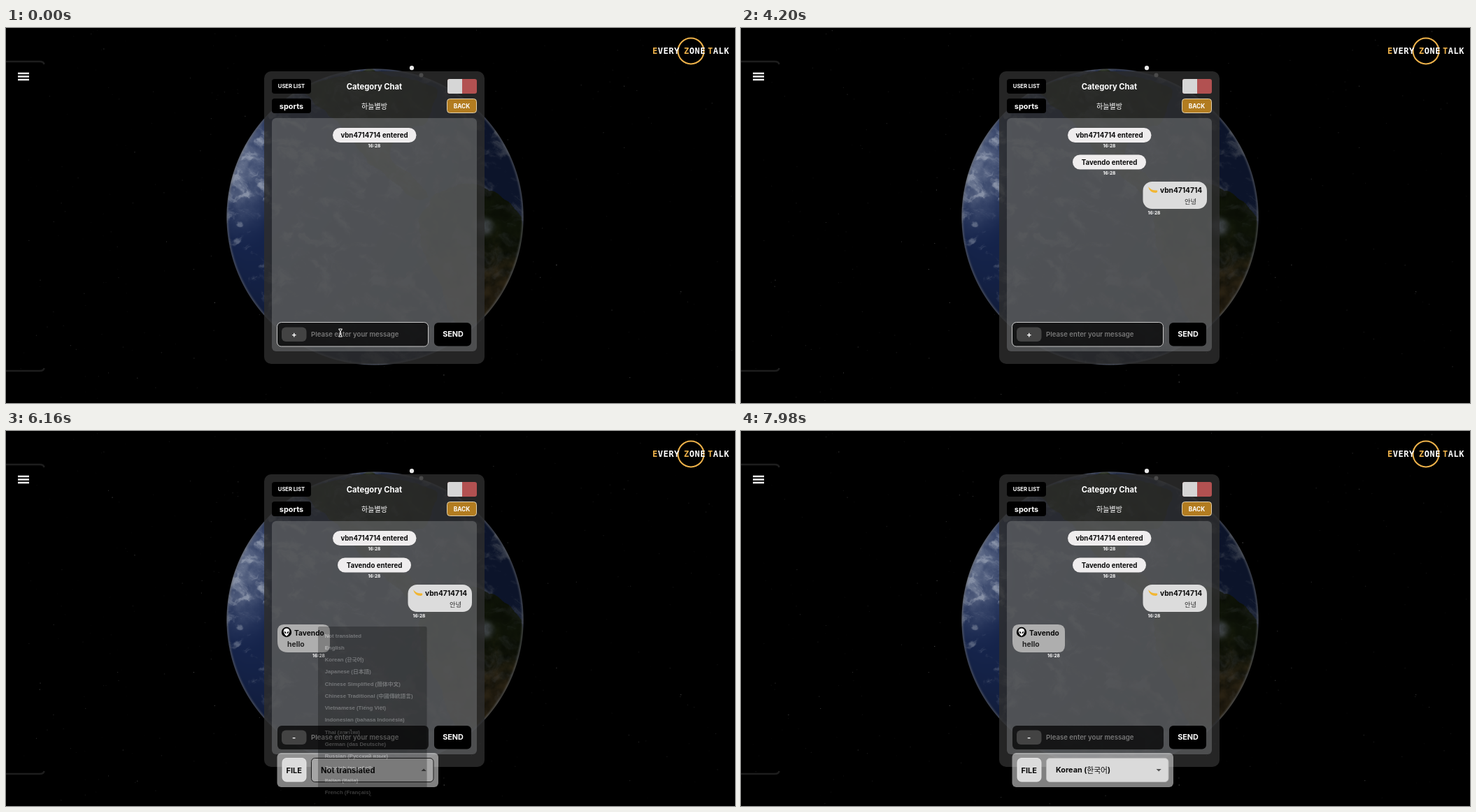
These frames come from a looping animation (1042x537 px, 8 s). An HTML page with a canvas:

```html
<!DOCTYPE html>
<html lang="en">
<head>
<meta charset="utf-8">
<title>Category Chat</title>
<style>
html, body { margin: 0; width: 100%; height: 100%; overflow: hidden; background: #000; }
canvas, svg { position: absolute; left: 0; top: 0; width: 1042px; height: 537px; }
text { font: 700 11.2px Inter, "Noto Sans CJK KR", "Noto Sans", sans-serif; dominant-baseline: central; fill: #fff; }
.mid { text-anchor: middle; }
.dark { fill: #0a0a0a; }
.bubble { font-size: 9.7px; }
.name { font-size: 10.2px; }
.time { font-size: 6.6px; }
.ko { font: 400 10px "Noto Sans CJK KR", "Noto Sans", sans-serif; }
.typed { font-size: 9.5px; }
.hint { font-size: 9.6px; font-weight: 600; fill: #777; }
.logo { font: 700 12px "DejaVu Sans Mono", monospace; letter-spacing: .5px; }
.logo tspan { fill: #eeb24a; }
.under { text-decoration: underline; }
#menu { transform-origin: 523.5px 502px; animation: grow 8s infinite paused; }
#menu text { font: 700 8.7px "Liberation Sans", "Noto Sans CJK KR", "Noto Sans", sans-serif; fill: #dedede; }
@keyframes grow {
  0%, 75.99% { opacity: 0; transform: scale(.75, .5625); animation-timing-function: cubic-bezier(.4, 0, .2, 1); }
  78.58% { transform: none; }
  79.88%, 90.13% { opacity: 1; animation-timing-function: cubic-bezier(.4, 0, .2, 1); }
  91.42% { transform: none; animation-timing-function: cubic-bezier(.4, 0, .2, 1); }
  94.01%, 100% { opacity: 0; transform: scale(.75, .5625); }
}
</style>
</head>
<body>
<canvas id="sky" width="1042" height="537"></canvas>
<canvas id="globe" width="1042" height="537"></canvas>
<svg viewBox="0 0 1042 537">
  <!-- side drawer -->
  <path d="M0 48H48Q54 48 54.5 52M0 491H48Q54 491 54.5 487" fill="none" stroke="#1d1d1d" stroke-width="2.5"/>
  <path d="M17 65H33M17 69.5H33M17 74H33" stroke="#f4f4f4" stroke-width="2.4"/>

  <!-- logo -->
  <circle cx="979" cy="33" r="18.5" fill="none" stroke="#eeb24a" stroke-width="2"/>
  <text class="logo" x="924" y="33"><tspan>E</tspan>VERY</text>
  <text class="logo" x="969" y="33"><tspan>Z</tspan>ONE</text>
  <text class="logo" x="1003" y="33"><tspan>T</tspan>ALK</text>

  <!-- panel -->
  <circle cx="580" cy="57.2" r="3.1" fill="#e8e8e8"/>
  <circle cx="593.5" cy="67.5" r="3" fill="#ddd"/>
  <rect x="369" y="62" width="315" height="419" rx="10" fill="rgba(45,45,45,.83)"/>
  <rect x="380" y="129" width="293" height="334" rx="6" fill="rgba(127,129,132,.45)"/>

  <rect x="380" y="73" width="56" height="21" rx="4"/>
  <text class="mid" x="408" y="83.5" style="font-size:7.6px">USER LIST</text>
  <rect x="380" y="101" width="56" height="21" rx="4"/>
  <text class="mid" x="408" y="111.5" style="font-size:10.9px">sports</text>
  <text class="mid" x="526.5" y="83.5">Category Chat</text>
  <text class="mid ko" x="526.5" y="111.5" fill="#ddd">하늘별방</text>
  <rect x="631" y="73" width="42" height="21" rx="3" fill="#b25151"/>
  <path d="M652 73H634Q631 73 631 76V91Q631 94 634 94H652Z" fill="#d6d6d6"/>
  <rect x="630.5" y="101.5" width="42" height="20" rx="4" fill="#b27c20" stroke="#e0d0b0"/>
  <text class="mid" x="651.5" y="111.5" style="font-size:8.3px">BACK</text>

  <!-- messages -->
  <rect x="467" y="143" width="119.5" height="21" rx="10.5" fill="#efedee"/>
  <text class="mid dark bubble" x="526.5" y="153.5">vbn4714714 entered</text>
  <text class="mid time" x="526.5" y="169">16:28</text>

  <g data-show="980 8000">
    <rect x="474" y="181.5" width="105" height="21" rx="10.5" fill="#efedee"/>
    <text class="mid dark bubble" x="526.5" y="192">Tavendo entered</text>
    <text class="mid time" x="526.5" y="207.5">16:28</text>
  </g>

  <g data-show="2520 8000">
    <rect x="574.5" y="220" width="91.5" height="39" rx="13" fill="#dcdcdc"/>
    <path d="M582 227Q586 233 595 232.5Q596 235 593 236Q584 236 582 227Z" fill="#f2b632"/>
    <text class="dark name" x="599" y="231.5">vbn4714714</text>
    <text class="mid ko" x="642.5" y="248" style="font-size:9.3px;fill:#333">안녕</text>
    <text class="mid time" x="590.5" y="264.5">16:28</text>
  </g>

  <g data-show="5810 8000">
    <path d="M397 277H453Q463 277 463 287V307Q463 317 453 317H403Q388 317 388 301V287Q388 277 397 277Z" fill="#aeaeae"/>
    <circle cx="401" cy="288" r="7.2"/>
    <path d="M401 282.5Q405.8 282.8 405.3 287.5Q404.5 291.5 401 294Q397.500 291.500 396.700 287.500Q396.200 282.800 401 282.500Z" fill="#f4f4f4"/>
    <path d="M398.600 287.800L399.700 289.200M403.400 287.800L402.300 289.200" stroke="#000" stroke-width="1.4" stroke-linecap="round"/>
    <text class="dark name" x="412" y="289">Tavendo</text>
    <text x="402" y="305.5" style="font-size:10.4px;fill:#242424">hello</text>
    <text class="mid time" x="447" y="321.5">16:28</text>
  </g>

  <!-- input -->
  <rect x="388" y="422" width="216" height="34" rx="6" fill="rgba(0,0,0,.72)"/>
  <rect data-show="0 4340" x="387.5" y="421.5" width="216" height="34.5" rx="6" fill="none" stroke="#c8c8c8"/>
  <rect x="394" y="428.5" width="35.5" height="20.5" rx="6" fill="#434343"/>
  <text class="mid" x="411.7" y="438.5" data-show="0 4340">+</text>
  <text class="mid" x="411.7" y="438.5" data-show="4340 8000">-</text>
  <text class="hint" x="436" y="438.5" data-show="0 1470 2520 8000">Please enter your message</text>
  <text class="ko typed under" x="436" y="438.5" data-show="1470 1610">ㅇ</text>
  <text class="ko typed under" x="436" y="438.5" data-show="1610 1750">아</text>
  <text class="ko typed under" x="436" y="438.5" data-show="1750 1960">안</text>
  <text class="ko typed" x="436" y="438.5" data-show="1960 2520">안</text>
  <text class="ko typed under" x="444.5" y="438.5" data-show="1960 2100">ㄴ</text>
  <text class="ko typed under" x="444.5" y="438.5" data-show="2100 2240">녀</text>
  <text class="ko typed under" x="444.5" y="438.5" data-show="2240 2520">녕</text>
  <path data-show="1470 1960" d="M444.500 433V444" stroke="#ddd"/>
  <path data-show="1960 2520" d="M453.500 433V444" stroke="#ddd"/>
  <rect x="612" y="422" width="53" height="33.5" rx="6"/>
  <text class="mid" x="639" y="438.5" style="font-size:10.8px">SEND</text>
  <path data-show="0 1400" d="M475.500 431H480.500L478 435V438L480.500 442H475.500L478 438V435Z" fill="#222" stroke="#f4f4f4"/>

  <!-- options -->
  <g data-show="4340 8000">
    <rect x="387.5" y="461" width="230.5" height="49" rx="6" fill="rgba(255,255,255,.5)"/>
    <rect x="395" y="468.5" width="34" height="33.5" rx="6" fill="#dcdcdc" stroke="#f0f0f0" stroke-width=".8"/>
    <text class="mid dark" x="411.8" y="485.5" style="font-size:11px">FILE</text>
    <rect data-show="4340 7210" x="436.5" y="468.5" width="174.5" height="34" rx="5" fill="#a5a5a5" stroke="#1a1a1a"/>
    <rect data-show="7210 8000" x="436.5" y="468.5" width="174.5" height="34" rx="5" fill="#dadada" stroke="#b8b8b8"/>
    <text class="dark" x="450" y="485.5" data-show="4340 7210">Not translated</text>
    <text class="dark" x="450" y="485.5" style="font-size:10.8px" data-show="7210 8000">Korean (<tspan style="font-weight:400">한국어</tspan>)</text>
    <path data-show="4340 6090 7210 8000" d="M593.500 484H600.800L597.150 487.600Z" fill="#555"/>
    <path data-show="6090 7210" d="M593.500 487H600.800L597.150 483.400Z" fill="#444"/>
  </g>

  <g id="menu"><rect x="437" y="232" width="173.5" height="330" rx="3"/></g>
</svg>
<script>
const W = 1042, H = 537, LOOP = 8000, STEP = 70;
const byId = id => document.getElementById(id);
const clamp = (v, a = 0, b = 1) => Math.min(b, Math.max(a, v));
const smooth = (a, b, v) => { const k = clamp((v - a) / (b - a)); return k * k * (3 - 2 * k); };
const mix = (a, b, k) => a.map((v, i) => v + (b[i] - v) * k);

// language list
["Not translated", "English", "Korean (한국어)", "Japanese (日本語)", "Chinese Simplified (简体中文)",
 "Chinese Traditional (中國傳統語言)", "Vietnamese (Tiếng Việt)", "Indonesian (bahasa Indonésia)",
 "Thai (ภาษาไทย)", "German (das Deutsche)", "Russian (Русский язык)", "Spanish (español)",
 "Italian (Italia)", "French (Français)"].forEach((label, i) => {
  const item = document.createElementNS("http://www.w3.org/2000/svg", "text");
  item.setAttribute("x", 448);
  item.setAttribute("y", 248 + 21 * i);
  item.textContent = label;
  byId("menu").append(item);
});

// value noise
function hash(x, y) {
  let h = Math.imul(x, 374761393) + Math.imul(y, 668265263);
  h = Math.imul(h ^ (h >>> 13), 1274126177);
  return ((h ^ (h >>> 16)) >>> 0) / 4294967296;
}
function noise(x, y) {
  const i = Math.floor(x), j = Math.floor(y), u = smooth(0, 1, x - i), v = smooth(0, 1, y - j);
  const a = hash(i, j), b = hash(i + 1, j), c = hash(i, j + 1), d = hash(i + 1, j + 1);
  return a + (b - a) * u + (c - a) * v + (a - b - c + d) * u * v;
}
function fbm(x, y) {
  let sum = 0, amp = .5;
  for (let k = 0; k < 5; k++, amp /= 2, x *= 2.03, y *= 2.03) sum += amp * noise(x, y);
  return sum;
}

function landMask() {
  const g = new OffscreenCanvas(W, H).getContext("2d");
  g.filter = "blur(5px)";
  g.fillStyle = "#fff";
  const shapes = [
    "M590 275L612 240L650 222L690 230L718 248L736 270L742 305L718 372L690 408L655 432L640 425L622 370L596 322Z",
    "M415 85L520 60L620 85L598 140L560 148L545 185L580 212L608 242L590 250L555 222L515 190L470 130Z"
  ];
  for (const d of shapes) g.fill(new Path2D(d));
  return g.getImageData(0, 0, W, H).data;
}

function drawGlobe() {
  const cx = 527, cy = 270, R = 212, g = byId("globe").getContext("2d");
  const image = g.createImageData(W, H), mask = landMask();
  for (let y = 56; y < 485; y++) for (let x = 313; x < 742; x++) {
    const nx = (x - cx) / R, ny = (y - cy) / R, r = Math.hypot(nx, ny);
    if (r > 1.01) continue;
    const nz = Math.sqrt(Math.max(0, 1 - r * r)), i = (y * W + x) * 4;
    const grain = fbm(x / 14 + 40, y / 14);
    const bend = fbm(x / 30 + 9, y / 30 + 3) * 3;
    const land = smooth(.42, .56, mask[i + 3] / 255 + (grain - .48) * .7);
    const soil = mix([25, 34, 13], [66, 54, 30], smooth(290, 385, y + (grain - .5) * 70));
    let color = mix([25, 42, 88], soil.map(v => v * (.55 + grain)), land);
    // soft bright air near the upper left limb, fine streaks elsewhere
    const haze = smooth(.62, 0, Math.hypot((nx + .9) * 1.9, ny + .38));
    const cloud = smooth(.47, .82, fbm(x / 17 + bend, y / 13 + bend));
    const puff = smooth(20, 2, Math.hypot(x - 683, y - 284)) * grain;
    const cover = cloud * (.6 - .4 * land) + haze * (.25 + .55 * grain) + puff;
    color = mix(color, [168, 178, 198], clamp(cover, 0, .85));
    const light = .48 + .5 * clamp(-.72 * nx - .35 * ny + .4 * nz);
    color = mix(color.map(v => v * light), [104, 106, 110], smooth(.98, 1, r) * .5);
    color.forEach((v, k) => image.data[i + k] = v);
    image.data[i + 3] = 255 * smooth(1.004, .997, r);
  }
  g.putImageData(image, 0, 0);
}

// faint twinkling stars
const stars = Array.from({ length: 380 }, (_, i) => ({
  x: 14 + hash(i, 1) * 1024, y: hash(i, 2) * 535,
  size: .7 + hash(i, 3) * .6, glow: .08 + hash(i, 4) ** 3 * .25,
  phase: hash(i, 5) * 6.28, speed: 1 + hash(i, 6) * 3
}));
function drawStars(t) {
  const g = byId("sky").getContext("2d");
  g.clearRect(0, 0, W, H);
  g.fillStyle = "#fff";
  for (const s of stars) {
    g.globalAlpha = s.glow * (.55 + .45 * Math.sin(s.phase + s.speed * t / 1000));
    g.fillRect(s.x, s.y, s.size, s.size);
  }
}

const timed = [...document.querySelectorAll("[data-show]")].map(el => ({ el, at: el.dataset.show.split(" ").map(Number) }));
function render(t) {
  for (const { el, at } of timed) {
    const shown = at.filter(time => time <= t).length % 2;
    el.style.display = shown ? "" : "none";
  }
  byId("menu").style.animationDelay = -t + "ms";
  drawStars(t > 5460 && t < 5810 ? 5460 : t);
}

drawGlobe();
render(0);
let start;
function tick(now) {
  start ??= now;
  const t = (now - start) % LOOP;
  render(Math.floor(t / STEP) * STEP);
  requestAnimationFrame(tick);
}
requestAnimationFrame(tick);
</script>
</body>
</html>
```
